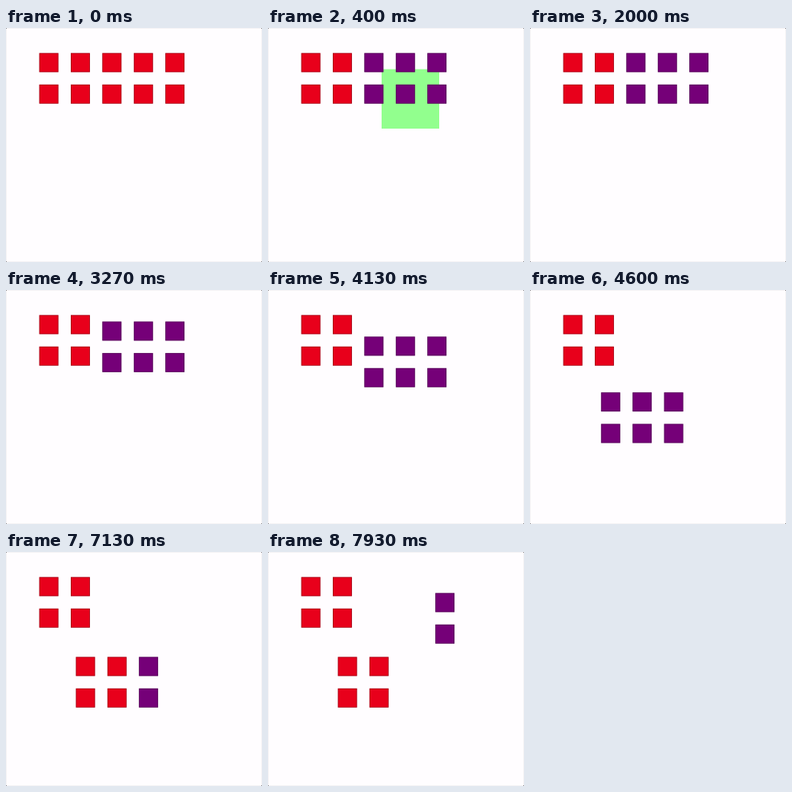
These frames come from a looping animation (320 by 293 pixels, 8000 ms). An HTML page with a canvas:

```html
<!DOCTYPE html>
<html lang="en">
<head>
<meta charset="utf-8">
<title>Select and drag squares</title>
<style>
  html, body { margin: 0; width: 100%; height: 100%; overflow: hidden; background: #fffdff; }
  canvas { display: block; width: 320px; height: 293px; }
</style>
</head>
<body>
<canvas id="stage" width="320" height="293"></canvas>
<script>
const W = 320, H = 293, LOOP = 8000, STEP = 1000 / 15;
const RED = '#e8001b', PURPLE = '#750078', GREEN = '#92ff8e';
const SIZE = 23.9, PITCH = 39.4, LEFT = 41.6, TOP = 31.4;
const BAND_START = 65, BAND_END = 530, DESELECT = 4730, REPICK = 5470;
const ctx = document.getElementById('stage').getContext('2d');

// Eased progress from 0 to 1 between two times
function ease(t, from, to) {
  const p = Math.min(1, Math.max(0, (t - from) / (to - from)));
  return p * p * (3 - 2 * p);
}

function bandAt(t) {
  const p = ease(t, BAND_START - STEP, 400);
  return { x: 214 - 72 * p, y: 126 - 74.4 * p, right: 214, bottom: 126 };
}

// The six squares go down a little, then further down and to the left
function groupOffset(t) {
  const nudge = ease(t, 3000, 3733), drag = ease(t, 4133, 4667);
  return [-33 * drag, 27 * nudge + 73 * drag];
}

// The last column drifts off, pauses, then rises quickly
function pairOffset(t) {
  const drift = ease(t, 7133, 7600), rise = ease(t, 7667, 7933);
  return [22 * drift + 21 * rise, -18 * drift - 62 * rise];
}

function isSelected(col, row, x, y, t) {
  if (t < BAND_START) return false;
  if (t < DESELECT) {
    const band = bandAt(t);
    return x + SIZE > band.x && x < band.right && y + SIZE > band.y && y < band.bottom;
  }
  return col === 4 && t >= REPICK + 400 * (1 - row);
}

function drawStage() {
  ctx.fillStyle = '#fffdff';
  ctx.fillRect(0, 0, W, H);
  ctx.lineWidth = 1;
  ctx.strokeStyle = '#f5f3f5';
  ctx.strokeRect(0.5, 0.5, W - 1, H - 1);
  ctx.fillStyle = '#8c8a8c';
  for (const x of [0, W - 1]) for (const y of [0, H - 1]) ctx.fillRect(x, y, 1, 1);
}

function drawBand(t) {
  if (t < BAND_START || t >= BAND_END) return;
  const { x, y, right, bottom } = bandAt(t);
  ctx.fillStyle = GREEN;
  ctx.fillRect(x, y, right - x, bottom - y);
}

function drawSquare(x, y, color) {
  ctx.fillStyle = color;
  ctx.fillRect(x, y, SIZE, SIZE);
  ctx.lineWidth = 0.8;
  ctx.strokeStyle = 'rgba(0, 0, 0, 0.3)';
  ctx.strokeRect(x + 0.4, y + 0.4, SIZE - 0.8, SIZE - 0.8);
}

function drawSquares(t) {
  const [groupX, groupY] = groupOffset(t), [pairX, pairY] = pairOffset(t);
  for (let row = 0; row < 2; row++) {
    for (let col = 0; col < 5; col++) {
      let x = LEFT + col * PITCH, y = TOP + row * PITCH;
      const color = isSelected(col, row, x, y, t) ? PURPLE : RED;
      if (col > 1) { x += groupX; y += groupY; }
      if (col > 3) { x += pairX; y += pairY; }
      drawSquare(x, y, color);
    }
  }
}

const start = performance.now();
function frame() {
  const elapsed = Math.max(0, performance.now() - start) % LOOP;
  const t = Math.floor((elapsed + 4) / STEP) * STEP % LOOP;
  drawStage();
  drawBand(t);
  drawSquares(t);
  requestAnimationFrame(frame);
}
frame();
</script>
</body>
</html>
```
